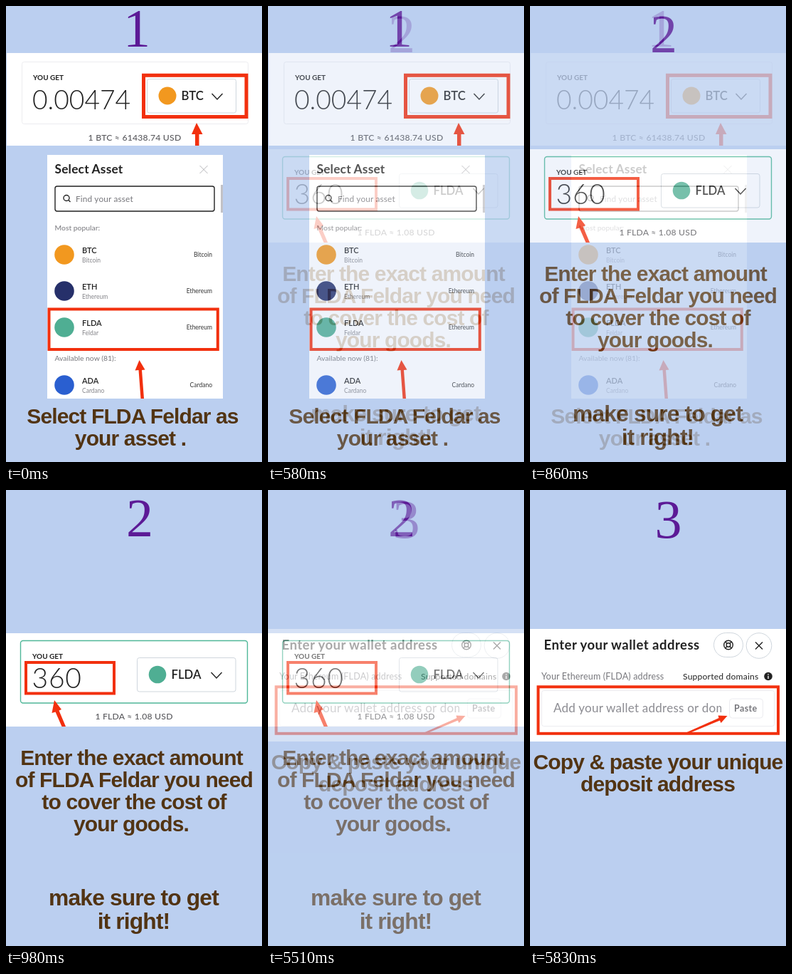
Write an HTML page that moves like this. It is 360 px wide and 640 px high and loops after 8 s.

```html
<!DOCTYPE html>
<html lang="en">
<head>
<meta charset="utf-8">
<title>Asset purchase steps</title>
<style>
  html, body { margin: 0; width: 100%; height: 100%; overflow: hidden; background: #bbcff0; }
  svg { display: block; width: 360px; height: 640px; }
  text { font-family: Lato, "Open Sans", sans-serif; fill: #222; }
  .bg { fill: #bbcff0; }
  .white { fill: #fff; }
  .step { font: 76px "Liberation Serif", "Times New Roman", serif; fill: #5c1a96; text-anchor: middle; }
  .caption { font: bold 30px "Liberation Sans", Arial, sans-serif; letter-spacing: -.87px; fill: #523413; text-anchor: middle; }
  .big { font-size: 31.8px; }
  .label { font-size: 10px; font-weight: 700; }
  .amount { font-size: 37.2px; font-weight: 300; }
  .rate { font-size: 12.2px; font-weight: 500; letter-spacing: .22px; fill: #5a5a5e; text-anchor: middle; }
  .coin { font-size: 16.7px; font-weight: 600; }
  .head { font-size: 17.3px; font-weight: 700; letter-spacing: .22px; }
  .group { font-size: 10.4px; fill: #77777c; }
  .ticker { font-size: 11px; font-weight: 600; }
  .name { font-size: 8.5px; fill: #85858a; }
  .chain { font-size: 8.5px; fill: #333; text-anchor: end; }
  .hint { font-size: 12.5px; letter-spacing: .18px; fill: #77777c; }
  .line { fill: none; stroke: #222; stroke-width: 1.4; }
  .faint { fill: none; stroke: #ececf0; }
  .edge { fill: none; stroke: #cfd6dd; }
  .mark { fill: none; stroke: #f2300e; stroke-width: 4; }
  .arrow { fill: #f2300e; }
</style>
</head>
<body>
<svg viewBox="0 0 360 640">
  <defs>
    <path id="chevron" class="line" d="M-7.5-4L0 4L7.5-4"/>
    <clipPath id="field"><rect x="30" y="290" width="239" height="40"/></clipPath>
  </defs>

  <g id="choose">
    <rect class="bg" width="360" height="640"/>
    <text class="step" x="184" y="57">1</text>

    <rect class="white" x="1" y="66" width="359" height="130"/>
    <rect class="faint" x="22.5" y="78.5" width="318" height="87" rx="3"/>
    <text class="label" x="38" y="103.5">YOU GET</text>
    <text class="amount" x="37" y="144.5">0.00474</text>
    <rect class="edge" x="198.5" y="102.5" width="125" height="47.5" rx="3"/>
    <circle cx="227" cy="126" r="12.5" fill="#f2981f"/>
    <text class="coin" x="246.5" y="132">BTC</text>
    <use href="#chevron" x="297" y="127"/>
    <rect class="mark" x="193.5" y="97.3" width="144.5" height="58.2" style="stroke-width:5"/>
    <path class="arrow" d="M268 164L276.5 180H271.5V196H266V180H261Z"/>
    <text class="rate" x="181" y="188.5">1 BTC ≈ 61438.74 USD</text>

    <rect class="white" x="58" y="209" width="247" height="342"/>
    <text class="head" x="68.5" y="235">Select Asset</text>
    <path d="M272.5 224l11 11m0-11l-11 11" stroke="#b4b4b8"/>
    <rect x="302" y="251" width="3" height="39" fill="#c2c2c6"/>
    <rect class="line" x="69" y="253" width="224" height="35" rx="3"/>
    <path class="line" d="M81 269.5a4 4 0 1 0 8 0a4 4 0 1 0-8 0M88 272.5l2.5 2.5"/>
    <text class="hint" x="98" y="274.5" style="font-size:11.8px">Find your asset</text>
    <text class="group" x="68.5" y="315">Most popular:</text>
    <g id="assets"></g>
    <text class="group" x="68.5" y="497.5">Available now (81):</text>
    <rect class="mark" x="60.5" y="425.5" width="237.3" height="56.5"/>
    <path class="arrow" d="M187.5 497L195.5 510.5L191 511L194 551H189.5L186.500 511L181.5 511.5Z"/>

    <text class="caption" x="178" y="585.5">Select FLDA Feldar as</text>
    <text class="caption" x="175" y="617">your asset .</text>
  </g>

  <g id="enter">
    <rect class="bg" width="360" height="640"/>
    <text class="step" x="188" y="65">2</text>
    <rect class="white" y="201" width="360" height="131"/>
    <rect x="20.5" y="211.5" width="319" height="87.5" rx="3.5" fill="none" stroke="#4fb798" stroke-width="1.4"/>
    <text class="label" x="37" y="236.5">YOU GET</text>
    <text class="amount" x="36.5" y="278" style="font-size:39px;letter-spacing:.8px">360</text>
    <rect class="edge" x="184.5" y="235.5" width="138.5" height="47.5" rx="3"/>
    <circle cx="213" cy="259" r="12.3" fill="#4fae93"/>
    <text class="coin" x="232.5" y="265">FLDA</text>
    <use href="#chevron" x="296" y="260"/>
    <rect class="mark" x="28" y="242" width="124" height="43.5"/>
    <path class="arrow" d="M68 295L78 308L74.5 309.5L84 332H78.5L69.5 311.5L64.5 313Z"/>
    <text class="rate" x="180" y="322">1 FLDA ≈ 1.08 USD</text>

    <text class="caption" x="176.5" y="385.5">Enter the exact amount</text>
    <text class="caption" x="180" y="416.5">of FLDA Feldar you need</text>
    <text class="caption" x="180" y="447.8">to cover the cost of</text>
    <text class="caption" x="176" y="479.3">your goods.</text>
    <text class="caption big" x="179.5" y="582.5">make sure to get</text>
    <text class="caption big" x="179.5" y="615.5">it right!</text>
  </g>

  <g id="paste">
    <rect class="bg" width="360" height="640"/>
    <text class="step" x="194.5" y="67">3</text>
    <rect class="white" y="195" width="360" height="158"/>
    <text class="head" x="19.5" y="224" style="font-size:18.5px;letter-spacing:.5px">Enter your wallet address</text>
    <rect class="edge" x="258.5" y="200.5" width="41" height="34" rx="17"/>
    <circle class="line" cx="279" cy="217.5" r="6.3"/>
    <circle class="line" cx="279" cy="217.5" r="2.8"/>
    <path class="line" d="M274.6 213.1l2.4 2.4m4 4l2.4 2.4m0-8.8l-2.4 2.4m-4 4l-2.4 2.4"/>
    <circle class="edge" cx="322" cy="218.5" r="17.8"/>
    <path class="line" d="M317 213.5l10 10m0-10l-10 10"/>
    <text class="hint" x="16" y="266">Your Ethereum (FLDA) address</text>
    <text class="hint" x="215" y="266" style="font-size:12.1px;font-weight:500;fill:#333">Supported domains</text>
    <circle cx="335" cy="261.5" r="5.8" fill="#222"/>
    <path d="M335 258v1.5m0 1.2v4.2" stroke="#fff" stroke-width="1.3"/>
    <rect class="faint" x="16.5" y="281.5" width="327" height="50" rx="3"/>
    <text class="hint" x="33" y="312" clip-path="url(#field)" style="font-size:17px;letter-spacing:.25px;fill:#8c8c92">Add your wallet address or domain</text>
    <rect class="faint" x="280.5" y="293" width="47" height="27" rx="4"/>
    <text class="hint" x="287" y="310.5" style="font-weight:700;letter-spacing:.4px">Paste</text>
    <rect class="mark" x="11.5" y="276.3" width="337.5" height="65.5"/>
    <path class="arrow" d="M277.5 317L268.5 327L267 323.5L221 342.5L219.5 340.5L265.5 320L264.5 316.5Z"/>

    <text class="caption" x="180" y="392">Copy &amp; paste your unique</text>
    <text class="caption" x="179.5" y="423.3">deposit address</text>
  </g>
</svg>
<script>
  const LOOP = 8000, STEP = 40, STEPS = 13;
  const byId = id => document.getElementById(id);

  const assets = [
    [349, "#f2981f", "BTC", "Bitcoin", "Bitcoin"],
    [400, "#26306a", "ETH", "Ethereum", "Ethereum"],
    [451, "#4fae93", "FLDA", "Feldar", "Ethereum"],
    [532, "#2a5fd0", "ADA", "Cardano", "Cardano"]
  ];
  byId("assets").innerHTML = assets.map(([y, color, ticker, name, chain]) => `
    <circle cx="82" cy="${y}" r="13.8" fill="${color}"/>
    <text class="ticker" x="107" y="${y - 2.5}">${ticker}</text>
    <text class="name" x="107" y="${y + 11}">${name}</text>
    <text class="chain" x="290" y="${y + 3}">${chain}</text>`).join("");

  // Each dissolve advances in equal, discrete steps.
  function dissolve(t, start) {
    const step = Math.floor((t - start) / STEP) + 1;
    return Math.max(0, Math.min(1, step / STEPS));
  }

  const begin = performance.now();
  function draw() {
    const t = (performance.now() - begin) % LOOP;
    byId("enter").setAttribute("opacity", dissolve(t, 500));
    byId("paste").setAttribute("opacity", dissolve(t, 5350));
    requestAnimationFrame(draw);
  }
  draw();
</script>
</body>
</html>
```
